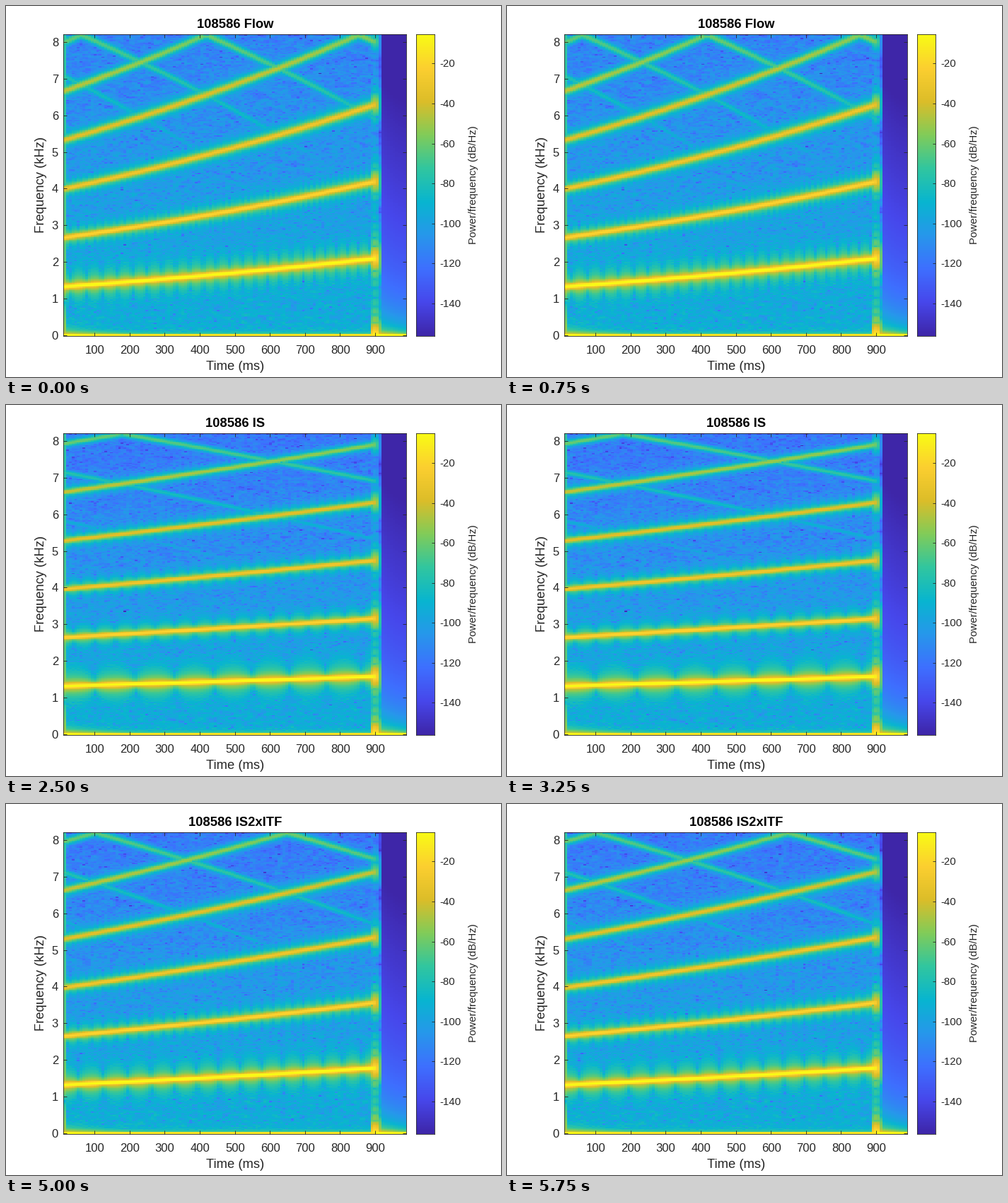
Recreate the animation shown at these times as a matplotlib script. Size 700 by 525 pixels, loop 6250 ms.

```python
import numpy as np
import matplotlib.pyplot as plt
from matplotlib.animation import FuncAnimation
from matplotlib.colors import LinearSegmentedColormap

W, H, DPI = 700, 525, 100
FS = 16384
WIN, HOP = 512, 128
START, STOP, FADE = 40, 0.9, 0.0045
INK = "#262626"
LEFT, RIGHT, TOP, BOTTOM = 81, 566, 40, 467
BAR_LEFT, BAR_RIGHT = 580, 606
FLOOR = -156.3

plt.rcParams["font.family"] = "Liberation Sans"

PARULA = LinearSegmentedColormap.from_list("parula", [
    "#3e26a8", "#4747eb", "#3e6fff", "#2797eb", "#08b5d0",
    "#31c69f", "#81cc59", "#dcbd29", "#fccf30", "#f9fb15"])

# title, first and last pitch (Hz), noise level at the top (dB), colour maximum
SWEEPS = [
    ("108586 Flow", 1322, 2098, -114, -5.4),
    ("108586 GT", 1322, 1784, -116, -5.4),
    ("108586 IS", 1317, 1580, -119, -5.0),
    ("108586 IS2", 1322, 1784, -114, -5.4),
    ("108586 IS2xITF", 1319, 1782, -118, -5.4),
]


def colored_noise(rng, top_db):
    """White noise whose density falls in a straight dB line up to Nyquist."""
    spec = np.fft.rfft(rng.standard_normal(FS))
    level = np.linspace(-91, top_db + 2, spec.size) + 10 * np.log10(FS / 2)
    return np.fft.irfft(spec * 10 ** (level / 20), FS)


def make_signal(first, last, top_db, seed):
    """Harmonic sweep in noise that gives way to a decaying offset."""
    t = np.arange(FS) / FS
    rate = np.log(last / first) / STOP
    pitch = first * np.exp(rate * t)
    phase = 2 * np.pi * (pitch - first) / rate
    x = 1.5 + 3 * np.exp(-t / 0.06)
    for h in range(1, 9):
        db = -5 - 15 * np.log2(h) - 10 * np.maximum(0, h * pitch / 1000 - 6.4)
        x += 10 ** ((db + 19.8) / 20) * np.sin(h * phase)
    x += colored_noise(np.random.default_rng(seed), top_db)
    x[:START] = 0
    tail = -2.5 - 2.5 * np.exp(-np.maximum(0, t - STOP) / 0.03)
    mix = (1 - np.cos(np.pi * np.clip((t - STOP) / FADE + 0.5, 0, 1))) / 2
    return x * (1 - mix) + tail * mix


def spectrogram(x):
    starts = np.arange(0, FS - WIN + 1, HOP)
    win = np.hanning(WIN)
    seg = x[starts[:, None] + np.arange(WIN)] * win
    power = np.abs(np.fft.rfft(seg, axis=1)) ** 2 / (FS * np.sum(win ** 2))
    power[:, 1:-1] *= 2
    return 10 * np.log10(power.T + 1e-17)


IMAGES = [spectrogram(make_signal(first, last, top, 7 + i))
          for i, (_, first, last, top, _) in enumerate(SWEEPS)]

fig = plt.figure(figsize=(W / DPI, H / DPI), dpi=DPI, facecolor="white")


def box(left, right):
    ax = fig.add_axes([left / W, 1 - BOTTOM / H,
                       (right - left) / W, (BOTTOM - TOP) / H])
    for spine in ax.spines.values():
        spine.set(color=INK, linewidth=0.6)
    return ax


def label(x, y, s, px, **kw):
    style = dict(color=INK, ha="center", va="baseline", rotation_mode="anchor")
    return fig.text(x / W, 1 - y / H, s, fontsize=px * 72 / DPI, **{**style, **kw})


def height_of(value, low, high):
    return BOTTOM - (value - low) / (high - low) * (BOTTOM - TOP)


# Main plot: cells are centred on their time and frequency
half_t, half_f = 500 * HOP / FS, FS / WIN / 2000
t0, t1 = 500 * WIN / FS - half_t, 1000 - 500 * WIN / FS + half_t
f0, f1 = -half_f, FS / 2000 + half_f

ax = box(LEFT, RIGHT)
image = ax.imshow(IMAGES[0], cmap=PARULA, origin="lower", aspect="auto",
                  interpolation="nearest", extent=(t0, t1, f0, f1))
ax.set_xticks(range(100, 1000, 100))
ax.set_yticks(range(9))
ax.tick_params(direction="in", length=3.5, width=0.6, color=INK, top=True,
               right=True, labelbottom=False, labelleft=False)

for ms in range(100, 1000, 100):
    label(LEFT + (ms - t0) / (t1 - t0) * (RIGHT - LEFT) + 0.5, 491.5,
          str(ms), 16.67)
for khz in range(9):
    label(74, height_of(khz, f0, f1) + 6, str(khz), 16.67, ha="right")
label(324, 515, "Time (ms)", 18.33)
label(54, 253, "Frequency (kHz)", 18.33, rotation=90)
title = label(324, 31, "", 18.33, color="black", weight="bold")

# Colour bar
bar = box(BAR_LEFT, BAR_RIGHT)
ramp = bar.imshow(np.arange(256)[:, None], cmap=PARULA, origin="lower",
                  aspect="auto", interpolation="nearest")
bar.set_xticks([])
bar.yaxis.tick_right()
bar.tick_params(direction="in", length=3, width=0.6, color=INK,
                labelright=False)
LEVELS = range(-140, 0, 20)
level_text = [label(613, 0, str(db), 15, ha="left") for db in LEVELS]
label(665, 253, "Power/frequency (dB/Hz)", 15, rotation=90)


def update(i):
    name, *_, peak = SWEEPS[i]
    title.set_text(name)
    image.set_data(IMAGES[i])
    image.set_clim(FLOOR, peak)
    ramp.set_extent((0, 1, FLOOR, peak))
    bar.set_ylim(FLOOR, peak)
    bar.set_yticks(LEVELS)
    for db, text in zip(LEVELS, level_text):
        text.set_y(1 - (height_of(db, FLOOR, peak) + 5) / H)
    return image, ramp, title, *level_text


anim = FuncAnimation(fig, update, frames=len(SWEEPS), interval=1250,
                     repeat=True, repeat_delay=0, blit=False)
plt.show()
```
